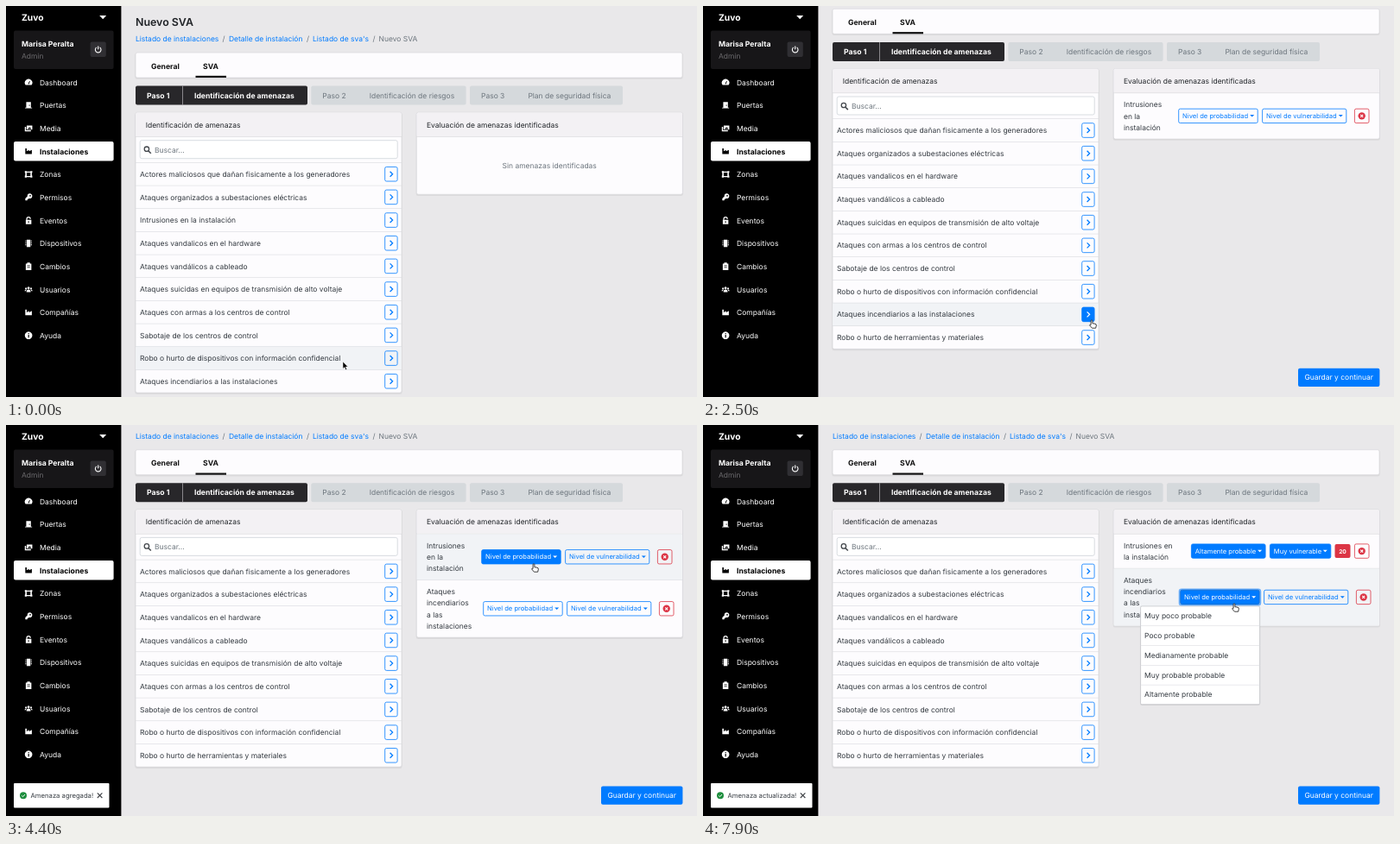
An HTML page for the animation above (8000 ms loop, 800 by 453 pixels).

```html
<!DOCTYPE html>
<html lang="es">
<head>
<meta charset="utf-8">
<title>Nuevo SVA</title>
<style>
html, body { margin: 0; width: 100%; height: 100%; overflow: hidden; background: #e9e8ea; }
svg { display: block; width: 800px; height: 453px; cursor: default; }
text { font-family: Inter, Roboto, Arial, sans-serif; font-size: 8.48px; text-rendering: geometricPrecision; white-space: pre; }
</style>
</head>
<body>
<svg viewBox="0 0 800 453">
  <g id="page"></g>
  <g id="side"></g>
  <g id="over"></g>
</svg>
<script>
const LOOP = 8000;
const BLUE = '#007bff', RED = '#dc3545', INK = '#343a40', GRAY = '#6c757d', TINT = '#f1f3f6';
const ROW = 26.667, LINE = 13.333;

const THREATS = [
  'Actores maliciosos que dañan fisicamente a los generadores',
  'Ataques organizados a subestaciones eléctricas',
  'Intrusiones en la instalación',
  'Ataques vandalicos en el hardware',
  'Ataques vandálicos a cableado',
  'Ataques suicidas en equipos de transmisión de alto voltaje',
  'Ataques con armas a los centros de control',
  'Sabotaje de los centros de control',
  'Robo o hurto de dispositivos con información confidencial',
  'Ataques incendiarios a las instalaciones',
  'Robo o hurto de herramientas y materiales'
];
const PROBS = ['Muy poco probable', 'Poco probable', 'Medianamente probable', 'Muy probable probable', 'Altamente probable'];
const VULNS = ['Muy poco vulnerable', 'Poco vulnerable', 'Medianamente vulnerable', 'Muy vulnerable', 'Altamente vulnerable'];

// Moments of the clicks
const AT = { add1: 1200, add2: 3300, openProb: 4900, pickProb: 6400, openVuln: 6800, pickVuln: 7100, openLast: 7650 };

// Tables of [time, values...]
const SCROLL = [[0, 0], [100, 0], [400, 50.7], [2650, 50.7], [2800, 52], [3300, 52], [3300, 25.3]];
const MOUSE = [
  [0, 390, 412], [100, 390, 412], [400, 430, 306], [500, 427, 272], [900, 444, 202], [1100, 446, 198],
  [1500, 446, 198], [2250, 450, 363.5], [2600, 450, 363.5], [2900, 449.3, 348.3], [3550, 449.3, 349],
  [4250, 611, 160.5], [4700, 611, 160.5], [5000, 610, 157.5], [5850, 610, 157.5], [6300, 562, 263],
  [6420, 562, 263], [6720, 700, 147], [6820, 700, 147], [7040, 680, 236], [7130, 680, 236],
  [7550, 615, 206.5]
];
const TOASTS = [
  [1250, 2350, 'Amenaza agregada!', 110.5],
  [3350, 4950, 'Amenaza agregada!', 110.5],
  [6420, 9000, 'Amenaza actualizada!', 117.5]
];

function sample(table, t) {
  let i = table.length - 1;
  while (i > 0 && table[i][0] > t) i--;
  const a = table[i], b = table[i + 1];
  if (!b) return a.slice(1);
  let u = (t - a[0]) / (b[0] - a[0]);
  u = u * u * (3 - 2 * u);
  return a.slice(1).map((v, k) => v + (b[k + 1] - v) * u);
}

const rect = (x, y, w, h, fill, extra = '') =>
  `<rect x="${x}" y="${y}" width="${w}" height="${h}" fill="${fill}" ${extra}/>`;
const text = (x, y, s, fill = INK, extra = '') => `<text x="${x}" y="${y}" fill="${fill}" ${extra}>${s}</text>`;
const path = (d, fill, extra = '') => `<path d="${d}" fill="${fill}" ${extra}/>`;
const size = (px, weight = 400) => `style="font-size:${px}px;font-weight:${weight}"`;
const BOLD = size(8.65, 700), SMALL = size(7.6);
const stroke = (c, w = 0.7) => `stroke="${c}" stroke-width="${w}"`;
const inside = (p, x, y, w, h) => p[0] >= x && p[0] <= x + w && p[1] >= y && p[1] <= y + h;

function card(x, y, w, h) {
  return rect(x - 0.6, y + 0.4, w + 1.2, h + 1.4, '#000', 'rx="2.5" opacity=".06"') +
    rect(x, y, w, h, '#fdfcfe', `rx="2" ${stroke('#d4d3d7', 0.6)}`);
}

function cardHead(x, y, title) {
  return rect(x + 0.3, y + 0.3, 307.4, 27.7, '#f3f1f4', 'rx="1.7"') +
    rect(x, y + 28, 308, 0.6, '#d6d5d9') + text(x + 11.7, y + 17.5, title, '#212529');
}

/* Main page */

function heading() {
  const crumb = [[150, 'Listado de instalaciones', BLUE], [250.500, '/', GRAY], [258, 'Detalle de instalación', BLUE],
    [348, '/', GRAY], [355, "Listado de sva's", BLUE], [424.500, '/', GRAY], [431.500, 'Nuevo SVA', GRAY]];
  let s = text(150, 23.2, 'Nuevo SVA', '#1f2226', size(12.4, 600));
  for (const [x, label, c] of crumb) s += text(x, 41.1, label, c);
  s += card(150, 54, 633, 29) + text(168, 72.7, 'General', '#111', BOLD) + text(228, 72.7, 'SVA', '#111', BOLD) +
    rect(219.5, 80.8, 35.5, 2.2, '#111');
  s += rect(150, 92.6, 199, 22, '#28272a', 'rx="2"') + rect(204.2, 92.6, 0.7, 22, '#b5b4b8') +
    text(163, 106.7, 'Paso 1', '#fff', BOLD) + text(218, 106.7, 'Identificación de amenazas', '#fff', BOLD);
  const later = [[353.300, 179.300, 'Paso 2', 'Identificación de riesgos'], [537, 177, 'Paso 3', 'Plan de seguridad física']];
  for (const [x, w, a, b] of later)
    s += rect(x, 92.6, w, 22, '#d5d9dc', 'rx="2"') + text(x + 13, 106.7, a, GRAY) + text(x + 67.4, 106.7, b, GRAY);
  return s;
}

function threatList(names, p, hot) {
  const h = 58.2 + names.length * ROW;
  let s = card(150, 123.2, 308, h) + cardHead(150, 123.2, 'Identificación de amenazas');
  s += rect(155.2, 155.7, 298, 21, '#fff', `rx="2" ${stroke('#c9ced4')}`) +
    `<circle cx="162.900" cy="165.700" r="2.700" fill="none" ${stroke('#43474c', 1.3)}/>` +
    path('M165 168l2.800 2.800', 'none', stroke('#43474c', 1.6)) + text(172, 169.5, 'Buscar...', GRAY);
  names.forEach((name, i) => {
    const y = 181.4 + i * ROW, c = y + ROW / 2;
    if (inside(p, 150, y, 308, ROW)) s += rect(150.4, y, 307.2, ROW, TINT);
    const on = inside(p, 438.5, c - 8.7, 15, 17.4);
    if (on) hot.hand = true;
    s += rect(150, y - 0.3, 308, 0.6, '#d9dbdf') + text(155, c + 3.1, name) +
      rect(438.7, c - 8.3, 14.4, 16.6, on ? BLUE : 'none', `rx="1.800" ${stroke(BLUE, 0.8)}`) +
      path(`M444.600 ${c - 3}l3 3-3 3`, 'none', stroke(on ? '#fff' : BLUE, 1.3));
  });
  return s;
}

function picker(b, c, p, hot) {
  const over = inside(p, b.x, c - 8.6, b.w, 17.2);
  if (over) hot.hand = true;
  const on = over || b.on || b.open, ink = on ? '#fff' : BLUE;
  let s = '';
  if (b.open) s += rect(b.x - 0.8, c - 9.2, b.w + 1.6, 18.4, 'none', `rx="2.500" ${stroke('#69aefb', 1.6)}`);
  s += rect(b.x + 0.4, c - 8.2, b.w - 0.8, 16.4, on ? BLUE : 'none', `rx="1.800" ${stroke(b.open ? '#0062cc' : BLUE, 0.8)}`);
  return s + text(b.x + 4.8, c + 2.7, b.label, ink, SMALL) + path(`M${b.x + b.w - 9.4} ${c - 1.3}h5l-2.500 2.500z`, ink);
}

function removeButton(x, c) {
  return rect(x + 0.4, c - 8.2, 16.6, 16.4, 'none', `rx="1.800" ${stroke(RED, 0.8)}`) +
    `<circle cx="${x + 8.7}" cy="${c}" r="4.200" fill="${RED}"/>` +
    path(`M${x + 7.2} ${c - 1.5}l3 3m0-3l-3 3`, 'none', stroke('#fff', 1.1));
}

function menu(b, c, p, hot) {
  const w = 138, x = b.x + b.w - w, y = c + 10.5, step = 22.8;
  let s = rect(x - 0.5, y, w + 1, 115, '#000', 'rx="2" opacity=".08"') +
    rect(x, y, w, 113.8, '#fff', `rx="1.500" ${stroke('#bfc0c4', 0.7)}`);
  b.open.forEach((label, i) => {
    const top = y + i * step;
    if (inside(p, x, top, w, step)) {
      hot.hand = true;
      s += rect(x + 0.4, top + 0.4, w - 0.8, step - 0.6, TINT);
    }
    if (i) s += rect(x, top - 0.3, w, 0.6, '#dcdde1');
    s += text(x + 4.5, top + 14.2, label);
  });
  return s;
}

function chosenRows(t) {
  const prob = t >= AT.pickProb, vuln = t >= AT.pickVuln, rows = [];
  const names = prob ? ['Intrusiones en', 'la instalación'] : ['Intrusiones', 'en la', 'instalación'];
  const probBtn = prob ? { x: vuln ? 565 : 556, w: 86.5, label: 'Altamente probable', on: true }
    : { x: 550.3, w: 92.3, label: 'Nivel de probabilidad', open: t >= AT.openProb && PROBS };
  const vulnBtn = vuln ? { x: 656, w: 71.2, label: 'Muy vulnerable', on: true }
    : { x: 647.2, w: 98, label: 'Nivel de vulnerabilidad', open: t >= AT.openVuln && VULNS };
  rows.push({ names, btns: [probBtn, vulnBtn], del: 754, score: vuln });
  if (t >= AT.add2) rows.push({
    names: ['Ataques', 'incendiarios', 'a las', 'instalaciones'],
    btns: [{ x: 552.3, w: 92.3, label: 'Nivel de probabilidad', open: t >= AT.openLast && PROBS },
      { x: 649.2, w: 98, label: 'Nivel de vulnerabilidad' }],
    del: 756
  });
  return rows;
}

function evaluation(t, p, hot) {
  const title = 'Evaluación de amenazas identificadas';
  if (t < AT.add1) return card(475.3, 123.2, 308, 95) + cardHead(475.3, 123.2, title) +
    text(629.2, 187.7, 'Sin amenazas identificadas', GRAY, 'text-anchor="middle"');
  let y = 151.4, body = '', menus = '', menuOver = false;
  const rows = chosenRows(t).map(r => {
    const h = r.names.length * LINE + 13.333;
    const row = { ...r, y, h, c: y + h / 2 };
    y += h;
    return row;
  });
  // An open menu keeps its own row highlighted
  const owner = rows.find(r => r.btns.some(b => b.open && inside(p, b.x + b.w - 138, r.c + 8, 138, 117)));
  for (const r of rows) {
    if (owner ? owner === r : inside(p, 475.3, r.y, 308, r.h)) body += rect(475.7, r.y + 0.3, 307.2, r.h - 0.6, TINT);
    if (r !== rows[0]) body += rect(475.3, r.y - 0.3, 308, 0.6, '#d9dbdf');
    r.names.forEach((n, i) => body += text(487, r.y + 16.5 + i * LINE, n));
    for (const b of r.btns) {
      body += picker(b, r.c, p, hot);
      if (b.open) menus += menu(b, r.c, p, hot);
    }
    if (r.score) body += rect(731.5, r.c - 8, 18, 16, RED, 'rx="2"') +
      text(740.5, r.c + 2.5, '20', '#fff', 'text-anchor="middle" ' + size(6.7, 700));
    body += removeButton(r.del, r.c);
  }
  return card(475.3, 123.2, 308, y - 123.2) + cardHead(475.3, 123.2, title) + body + menus;
}

function page(t, p, hot) {
  const gone = [t >= AT.add1 && THREATS[2], t >= AT.add2 && THREATS[9]];
  const names = THREATS.filter(n => !gone.includes(n)).slice(0, 10);
  const save = 470.4 - (10 - names.length) * ROW;
  return heading() + threatList(names, p, hot) + evaluation(t, p, hot) +
    rect(689, save, 94.4, 21.2, BLUE, 'rx="2"') +
    text(736.2, save + 13.7, 'Guardar y continuar', '#fff', 'text-anchor="middle"');
}

/* Sidebar, icons on a 16 unit grid */

const FACTORY = 'M1 2h3v6l5-3v3l6-3v9H1z';
const MENU = [
  ['Dashboard', 'M1.500 14A8 8 0 1 1 14.500 14zM7 11.500L10 5l1.200.6L9 12z'],
  ['Puertas', 'M3 1h10v12h2.500v1.700H.5V13H3zM9 7v2.200h1.700V7z'],
  ['Media', 'M4 2h12v9H4zM0 5h2.600v7.500H13V14.500H0zM6 9.500h8l-3-4-2 2-1-1z'],
  ['Instalaciones', FACTORY],
  ['Zonas', 'M0 1h4v1h8V1h4v4h-1v6h1v4h-4v-1H4v1H0v-4h1V5H0zM4 4.500v7h8v-7z'],
  ['Permisos', 'M10.500 0a5.300 5.300 0 1 1-1.700 10.300L7 12H5.500v2.500H1v-4l4.500-4.500A5.300 5.300 0 0 1 10.500 0zM11.500 3a1.500 1.500 0 1 0 .1 0z'],
  ['Eventos', 'M3 7V5a5 5 0 0 1 10 0h-2.200a2.800 2.800 0 0 0-5.600 0v2H14v9H2V7zM7 9.500v4h2v-4z'],
  ['Dispositivos', 'M4 0h8v16H4zM1 2h2v2H1zM1 6h2v2H1zM1 10h2v2H1zM13 2h2v2h-2zM13 6h2v2h-2zM13 10h2v2h-2z'],
  ['Cambios', 'M2 2h3V0h6v2h3v14H2zM5 6h6v1.400H5zM5 9.500h6v1.400H5z'],
  ['Usuarios', 'M8 2.500a2.600 2.600 0 1 1-.1 0zM3.500 14a4.500 5.500 0 0 1 9 0zM2.500 4a2 2 0 1 1-.1 0zM13.500 4a2 2 0 1 1-.1 0zM-.5 11.500q0-3 3.500-3l1 .5q-1.500 1-1.700 2.500zM16.500 11.500q0-3-3.500-3l-1 .5q1.500 1 1.700 2.500z'],
  ['Compañías', FACTORY],
  ['Ayuda', 'M8 0a8 8 0 1 1-.01 0zM7 7v6h2.200V7zM7 3v2.300h2.200V3z']
];

function sidebar() {
  let s = rect(0, 0, 133.4, 453, '#000') + text(18, 16.8, 'Zuvo', '#fff', size(10.3, 700)) +
    path('M108.200 11h8l-4 4.300z', '#fff') + rect(9, 28.4, 115.6, 44.5, '#171618', 'rx="2"') +
    text(18, 47.2, 'Marisa Peralta', '#fff', size(8.65, 700)) + text(18, 60.6, 'Admin', '#6b6a6d') +
    rect(97.6, 41.5, 18.2, 17.6, '#302f33', 'rx="2"') +
    path('M104.800 47.900a3.300 3.300 0 1 0 3.800 0M106.700 46.600v3.600', 'none', stroke('#fff', 1.1));
  MENU.forEach(([label, icon], i) => {
    const y = 88.4 + i * ROW, on = i === 3, c = on ? '#000' : '#fff';
    if (on) s += rect(9, y - 11.3, 115.6, 22.4, '#fff', 'rx="2"');
    s += path(icon, c, `fill-rule="evenodd" transform="translate(21.800 ${y - 4.4}) scale(.54)"`) +
      text(39, y + 3.1, label, c, on ? BOLD : '');
  });
  return s;
}

/* Toast and pointer */

function toast(t) {
  const hit = TOASTS.find(([a, b]) => t >= a && t < b);
  if (!hit) return '';
  const [a, b, label, w] = hit, k = Math.min(1, (t - a) / 150, (b - t) / 150);
  return `<g opacity="${k}" transform="translate(0 ${(1 - k) * 12})">` + rect(9, 415, w, 28.6, '#fff', 'rx="1"') +
    '<circle cx="20" cy="429.300" r="4" fill="#1e8e3e"/>' + path('M18.200 429.400l1.300 1.300 2.400-2.600', 'none', stroke('#fff', 1)) +
    text(28.5, 432, label, INK, size(7.7)) +
    path(`M${w - 4.700} 426.400l5.600 5.600m0-5.600l-5.600 5.600`, 'none', stroke('#44474b', 1.2)) + '</g>';
}

function pointer([x, y], hand) {
  const shape = hand
    ? path('M2.600.3q.9 0 .9.9v3l3 .5q1.700.3 1.400 2l-.6 3H3L.2 6.400q.4-1.300 1.500-.5V1.200q0-.9.9-.9z', '#fff', stroke('#111', 0.8))
    : path('M0 0v8.300l1.900-1.700 1.300 2.900 1.400-.6-1.300-2.800h2.500z', '#000', stroke('#fff', 0.5));
  return `<g transform="translate(${hand ? x - 2.6 : x} ${y})">${shape}</g>`;
}

const layer = id => document.getElementById(id);
const last = {};
function put(id, html) {
  if (last[id] !== html) layer(id).innerHTML = last[id] = html;
}

function draw(now) {
  const t = now % LOOP, [scroll] = sample(SCROLL, t), hot = { hand: false };
  // Hover trails the pointer slightly
  const [hx, hy] = sample(MOUSE, Math.max(0, t - 80));
  put('page', page(t, [hx, hy + scroll], hot));
  layer('page').setAttribute('transform', `translate(0 ${-scroll})`);
  put('over', toast(t) + pointer(sample(MOUSE, t), hot.hand));
}

put('side', sidebar());
const start = performance.now();
function tick() {
  draw(performance.now() - start);
  requestAnimationFrame(tick);
}
tick();
</script>
</body>
</html>
```
